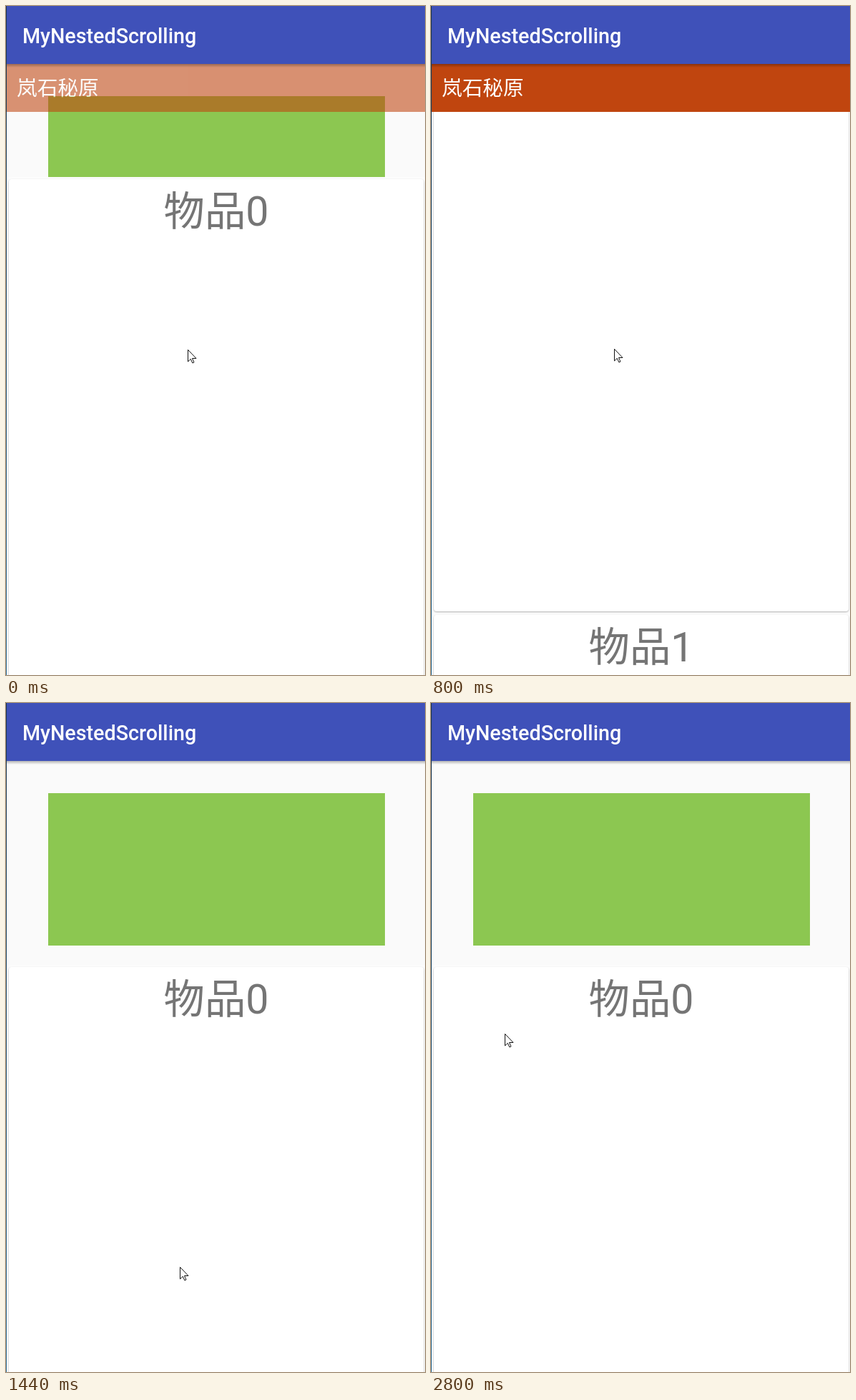
Animation, 586 px wide and 935 px high, one loop 3760 ms. Source, as an HTML page:

```html
<!DOCTYPE html>
<html lang="zh-CN">
<head>
<meta charset="utf-8">
<title>MyNestedScrolling</title>
<style>
  html, body { margin: 0; width: 100%; height: 100%; overflow: hidden; background: #fafafa; }
  svg { display: block; width: 586px; height: 935px; }
  text { font-family: Roboto, "Noto Sans CJK SC", "Noto Sans CJK", sans-serif; }
  .card { fill: #fff; filter: drop-shadow(0 1px 1px rgba(0, 0, 0, .3)); }
  .item { font-size: 57.3px; fill: #757575; text-anchor: middle; }
  .title { font-size: 28.7px; fill: #fff; }
</style>
</head>
<body>
<svg viewBox="0 0 586 935">
  <defs>
    <linearGradient id="shade" x2="0" y2="1">
      <stop stop-opacity=".28"/>
      <stop offset="1" stop-opacity="0"/>
    </linearGradient>
    <linearGradient id="edge" x2="0" y2="1">
      <stop stop-color="#16324c"/>
      <stop offset="1" stop-color="#2a6a92"/>
    </linearGradient>
  </defs>
  <rect width="586" height="935" fill="#fafafa"/>
  <rect x="59" y="126" width="471" height="213" fill="#8cc751"/>
  <g id="list">
    <rect y="-3" width="586" height="1600" fill="#fcfcfc"/>
    <rect class="card" x="4" width="580" height="788" rx="4"/>
    <text class="item" x="294" y="64.5">物品0</text>
    <rect class="card" x="4" y="793" width="580" height="788" rx="4"/>
    <text class="item" x="294" y="857.5">物品1</text>
  </g>
  <g id="bar">
    <rect y="81" width="586" height="67" fill="#c0450f"/>
    <text class="title" x="15" y="125">岚石秘原</text>
  </g>
  <rect y="81" width="586" height="5" fill="url(#shade)"/>
  <rect width="586" height="81" fill="#3f51b9"/>
  <text class="title" x="22.9" y="52" font-weight="500">MyNestedScrolling</text>
  <rect width="1" height="935" fill="url(#edge)"/>
  <path id="cursor" d="M.5 .5V17L4.3 13.4L6.9 19L9 18L6.5 12.5H12Z" fill="#fff" stroke="#111" stroke-width="1"/>
</svg>
<script>
  const LOOP = 3760, STEP = 80, REST = 369, PINNED = 148;

  const easeIn = k => p => p ** k;
  const easeOut = k => p => 1 - (1 - p) ** k;

  // Each stop: time, position, easing on the way there (linear if absent).
  const scroll = [
    { t: 0, at: [242] },
    { t: 240, at: [105] },
    { t: 560, at: [46], ease: easeOut(2) },
    { t: 640, at: [46] },
    { t: 1200, at: [317], ease: easeIn(2.5) },
    { t: 1440, at: [REST], ease: easeOut(2) }
  ];
  const pointer = [
    { t: 0, at: [254, 480] },
    { t: 240, at: [261, 337] },
    { t: 560, at: [262, 327], ease: easeOut(3) },
    { t: 1200, at: [248, 688], ease: easeOut(1.16) },
    { t: 1440, at: [243, 788] },
    { t: 1840, at: [243, 788] },
    { t: 2400, at: [109, 562], ease: easeIn(1.3) },
    { t: 2560, at: [97, 508] },
    { t: 2800, at: [103, 462], ease: easeOut(1.5) }
  ];

  const $ = id => document.getElementById(id);
  const list = $("list"), bar = $("bar"), cursor = $("cursor");

  function sample(stops, t) {
    const i = stops.findIndex(s => s.t > t);
    if (i < 0) return stops[stops.length - 1].at;
    const a = stops[i - 1], b = stops[i];
    const p = (t - a.t) / (b.t - a.t);
    const q = b.ease ? b.ease(p) : p;
    return a.at.map((v, n) => Math.round(v + (b.at[n] - v) * q));
  }

  const move = (el, x, y) => el.setAttribute("transform", `translate(${x} ${y})`);

  function draw() {
    const t = Math.floor(performance.now() % LOOP / STEP) * STEP;
    const [top] = sample(scroll, t);
    move(list, 0, top);
    bar.setAttribute("opacity", Math.min(1, (REST - top) / (REST - PINNED)));
    move(cursor, ...sample(pointer, t));
    requestAnimationFrame(draw);
  }
  draw();
</script>
</body>
</html>
```
